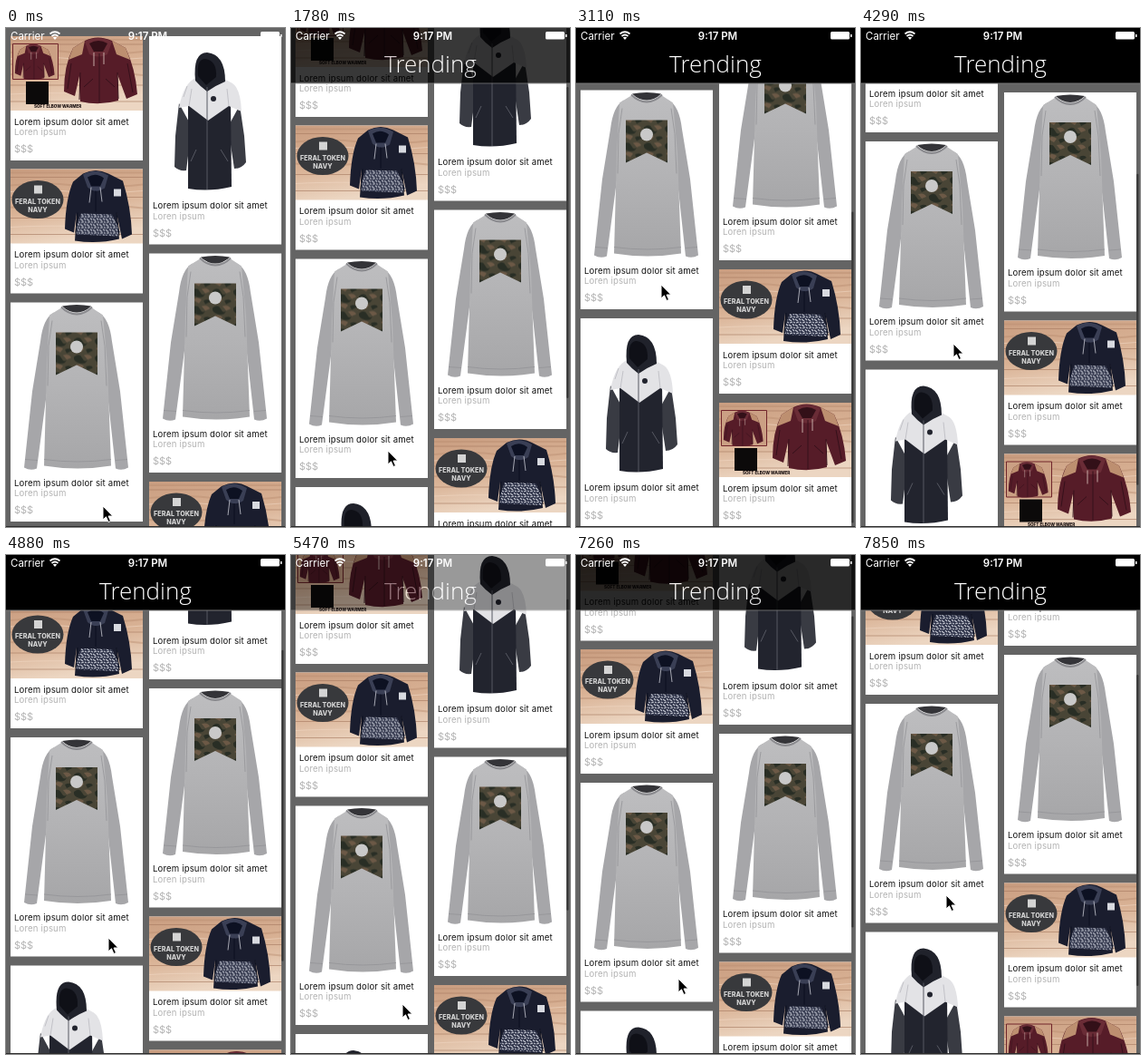
An HTML page for the animation above (8 s loop, 308 by 550 pixels).

```html
<!DOCTYPE html>
<html lang="en">
<head>
<meta charset="utf-8">
<title>Trending</title>
<style>
  html, body { margin: 0; width: 100%; height: 100%; overflow: hidden; background: #646464; }
  svg { display: block; width: 308px; height: 550px; }
  text { font-family: Inter, Roboto, sans-serif; }
  .name { font-size: 9.6px; letter-spacing: .14px; fill: #111; }
  .sub { font-size: 9.6px; letter-spacing: .14px; fill: #b2b2b2; }
  .price { font-size: 11px; fill: #b2b2b2; }
  .status { font-size: 11.5px; fill: #fff; }
  .label { font-size: 7.2px; font-weight: 800; fill: #d4d4d4; text-anchor: middle; }
  .caption { font-size: 4.6px; font-weight: 800; fill: #1a1010; }
  .heading { font: 300 26px "Open Sans", "Noto Sans", sans-serif; fill: #fff; text-anchor: middle; }
</style>
</head>
<body>
<svg viewBox="0 0 308 550">
  <defs>
    <linearGradient id="wood" x2=".3" y2="1">
      <stop offset="0" stop-color="#c99d80"/>
      <stop offset=".55" stop-color="#d9b295"/>
      <stop offset="1" stop-color="#ecd6c2"/>
    </linearGradient>
    <linearGradient id="knit" x2="0" y2="1">
      <stop offset="0" stop-color="#bdbdbf"/>
      <stop offset=".5" stop-color="#b3b3b5"/>
      <stop offset="1" stop-color="#a6a6a8"/>
    </linearGradient>
    <pattern id="camo" width="23" height="19" patternUnits="userSpaceOnUse">
      <path fill="#494536" d="M0 0h23v19H0z"/>
      <path fill="#292e25" d="M1 3q6-5 9 1t6 2q-2 6-9 4T1 3zM14 14q6-3 8 1l-6 3z"/>
      <path fill="#6c5946" d="M12 1q7-2 9 3l-5 2zM2 13q5-4 10 0l-3 4z"/>
    </pattern>
    <pattern id="print" width="7" height="6" patternUnits="userSpaceOnUse">
      <path fill="#30354b" d="M0 0h7v6H0z"/>
      <path stroke="#c3c6d0" stroke-width="1.1" d="M0 1l3 2M4 0l2 2M1 5l3-1M5 4l2 1"/>
    </pattern>

    <g id="copy">
      <text class="name" x="4" y="-39.5">Lorem ipsum dolor sit amet</text>
      <text class="sub" x="4" y="-28">Loren ipsum</text>
      <text class="price" x="4" y="-9">$$$</text>
    </g>

    <g id="planks">
      <path fill="url(#wood)" d="M0 0h146v82H0z"/>
      <path fill="none" stroke="#a87c62" stroke-width=".9" opacity=".7" d="M0 9h146M0 31h146M0 54h146M0 72h146"/>
      <path fill="none" stroke="#b88c70" stroke-width="2" opacity=".45" d="M0 4h146M0 18q40-4 70 0t76-1M0 42q30 4 70 0t76 1"/>
      <path fill="none" stroke="#f0d8c4" opacity=".6" d="M0 25q40-3 70 0t76-1M0 64q50-3 146 1"/>
    </g>

    <g id="hoodie">
      <path fill="#561c28" d="M82 5Q96-2 112 5L127 13Q138 36 140 64L128 69 118 42 119 71Q98 77 77 72L76 44 71 66 59 61Q59 32 69 13z"/>
      <path fill="#bd8f70" d="M82 5L69 13 64 26 79 20zM112 5L127 13 132 26 117 20z"/>
      <path fill="#6a2c36" d="M82 6Q96-2 112 6L107 20Q97 25 87 20z"/>
      <path fill="#331018" d="M87 8Q97 2 107 8L102 17H92z"/>
      <path fill="none" stroke="#35101a" d="M98 19V73M81 56l10-9M115 56l-10-9M77 40l-1 30M118 40l1 29M67 30l-4 28M129 30l6 32"/>
      <path stroke="#e0cfc5" stroke-width=".8" d="M92 18v15M103 18v13"/>
    </g>

    <g id="red">
      <path fill="#fff" d="M0 0h146v137H0z"/>
      <use href="#planks"/>
      <path fill="#cba084" stroke="#70252b" d="M2.500 8.500h50v39h-50z"/>
      <use href="#hoodie" transform="translate(-27 8) scale(.54)"/>
      <use href="#hoodie"/>
      <path fill="#0c0a0a" d="M17 50h25v25H17z"/>
      <text class="caption" x="26" y="79">SOFT ELBOW WARMER</text>
      <use href="#copy" y="137"/>
    </g>

    <g id="navy">
      <path fill="#fff" d="M0 0h146v137H0z"/>
      <use href="#planks"/>
      <ellipse cx="30" cy="33.500" rx="28.500" ry="21" fill="#38393c"/>
      <path fill="#d4d4d4" d="M26 18h9v9h-9z"/>
      <text class="label" x="30" y="38">FERAL TOKEN</text>
      <text class="label" x="30" y="47">NAVY</text>
      <path fill="#1a1d2e" d="M80 5Q94-2 108 5L124 13Q133 42 134 72L123 77 117 48 120 77Q96 83 71 79L73 48 70 70 60 66Q61 32 69 14z"/>
      <path fill="#3a3f55" d="M80 6Q94-2 108 7L104 21Q94 28 85 20z"/>
      <path fill="#0d1122" d="M85 9Q94 3 103 10L99 19H89z"/>
      <path fill="url(#print)" d="M78 49L112 50 121 69 118 74 73 72 72 65z"/>
      <path fill="none" stroke="#0b0f1e" d="M94 24V47M74 48l-2 22M117 48l3 25"/>
      <path stroke="#c9cbd4" stroke-width=".8" d="M89 20l-2 17M99 20l2 16"/>
      <path fill="#d8dae0" d="M114 22h8v8h-8z"/>
      <use href="#copy" y="137"/>
    </g>

    <g id="sweater">
      <path fill="#fff" d="M0 0h146v241.500H0z"/>
      <path fill="#a6a6a9" d="M48 11Q36 17 33 43L24 98 15 182q7 4 14 1L41 92 46 50zM97 11Q109 17 112 43L121 98 130 182q-7 4-14 1L106 92 100 50z"/>
      <path fill="url(#knit)" d="M56 6Q73 16 90 6L102 14 107 70 111 180Q74 186 37 180L40 70 43 14z"/>
      <path fill="none" stroke="#939397" stroke-width=".8" d="M41 92L42 48 46 20M106 92L104 48 100 20M37 173Q74 178 111 173M16 173l14 1M116 174l13-1"/>
      <path fill="#343438" d="M57 4Q73 1 89 4 82 11 73 11T57 4z"/>
      <path fill="none" stroke="#8a8a8e" stroke-width="2" d="M56 5Q64 13 73 13T90 5"/>
      <path fill="url(#camo)" d="M50 33H96V80L73 69 50 80z"/>
      <circle cx="73" cy="49" r="7" fill="#c9c9c9"/>
      <use href="#copy" y="241.500"/>
    </g>

    <g id="jacket">
      <path fill="#fff" d="M0 0h146v229.500H0z"/>
      <path fill="#393b43" d="M33 74L29 110 28 144Q33 149 41 148L47 100zM100 76L105 110 107 139Q102 146 94 146L87 100z"/>
      <path fill="#22242e" d="M43 70H90L91 166Q66 172 43 168z"/>
      <path fill="#e3e3e6" d="M52 46Q38 51 33 79L44 77 65 93 88 77 102 83Q101 58 92 52L81 46z"/>
      <path fill="none" stroke="#b9b9bf" stroke-width=".8" d="M44 77l3-19M88 77l-2-19M38 67l4-12"/>
      <path fill="#20222b" d="M51 49Q48 18 64 18 84 20 84 50 74 54 64 61 56 55 51 49z"/>
      <path fill="#0f1017" d="M54 44Q52 25 62 25 75 27 74 45L63 54z"/>
      <path fill="none" stroke="#565862" d="M64 56V169M46 138l6-13M87 138l-8-13"/>
      <circle cx="71" cy="69" r="3" fill="#22242e"/>
      <use href="#copy" y="229.500"/>
    </g>
  </defs>

  <path fill="#646464" d="M0 0h308v550H0z"/>
  <g id="list">
    <use href="#red" x="5"/>
    <use href="#navy" x="5" y="146.500"/>
    <use href="#sweater" x="5" y="293.500"/>
    <use href="#jacket" x="5" y="545"/>
    <use href="#jacket" x="158"/>
    <use href="#sweater" x="158" y="239.500"/>
    <use href="#navy" x="158" y="491"/>
    <use href="#red" x="158" y="638"/>
  </g>
  <rect id="bar" x="304" width="2.500" height="343" rx="1.250" opacity=".4"/>
  <path fill="#2c2c2c" d="M0 549h308v1H0z"/>

  <g id="header">
    <path d="M0 0h308v61H0z"/>
    <path fill="#777" d="M0 60.500h308v1H0z"/>
    <text class="heading" x="154" y="49">Trending</text>
  </g>

  <text class="status" x="5" y="12.500">Carrier</text>
  <g fill="none" stroke="#fff" stroke-width="1.700">
    <path d="M48.500 6.500q5.500-4.500 11 0M50.500 9q3.500-3 7 0"/>
    <path fill="#fff" stroke="none" d="M51.800 10.500q2.200-1.600 4.400 0L54 13z"/>
  </g>
  <text class="status" x="156.500" y="12.500" text-anchor="middle" font-weight="600">9:17 PM</text>
  <rect x="281" y="4" width="21" height="8.500" rx="1.500" fill="#fff"/>
  <path fill="#fff" d="M303 7h1.500v3H303z"/>

  <path id="cursor" stroke="#fff" stroke-width="1" d="M0 0V15L3.500 11.800 6 17.500 8.500 16.400 6 11H10.800z"/>
</svg>
<script>
  const LOOP = 8000, STEP = 148.1;
  // step, list offset, cursor x, cursor y
  const keys = [
    [0, 9, 107, 527], [6, 9, 107, 527], [8, 4, 107, 518], [12, -39, 107, 466],
    [21, -225, 94, 283], [23, -233, 94, 275], [25, -233, 94, 275],
    [29, -168.5, 102, 348], [37, -17, 123, 495], [39, 10, 125, 524],
    [41, 18, 126, 535], [42, 20, 126, 537], [44, 20, 126, 537],
    [45, 19, 126, 535], [47, 1, 122, 513], [53, -129.5, 94, 375]
  ];
  const [list, bar, header, cursor] =
    ['list', 'bar', 'header', 'cursor'].map(id => document.getElementById(id));

  const clamp = v => Math.max(0, Math.min(1, v));
  const move = (el, x, y) => el.setAttribute('transform', `translate(${x} ${y})`);

  function poseAt(step) {
    const i = Math.max(1, keys.findIndex(key => key[0] >= step));
    const a = keys[i - 1], b = keys[i];
    const p = (step - a[0]) / (b[0] - a[0]);
    return a.map((v, j) => v + (b[j] - v) * p);
  }

  function draw(now) {
    // The screen refreshes in discrete steps
    const step = Math.min(53, Math.floor((now % LOOP) / STEP + .08));
    const [, y, cx, cy] = poseAt(step);
    move(list, 0, Math.round(y * 2) / 2);
    move(cursor, Math.round(cx), Math.round(cy));
    move(bar, 0, 22 + (19 - y) * .74);
    bar.style.visibility = step < 8 ? 'hidden' : 'visible';
    header.setAttribute('opacity', clamp((6 - y) / 58));
  }

  const start = performance.now();
  function tick() {
    draw(performance.now() - start);
    requestAnimationFrame(tick);
  }
  tick();
</script>
</body>
</html>
```
